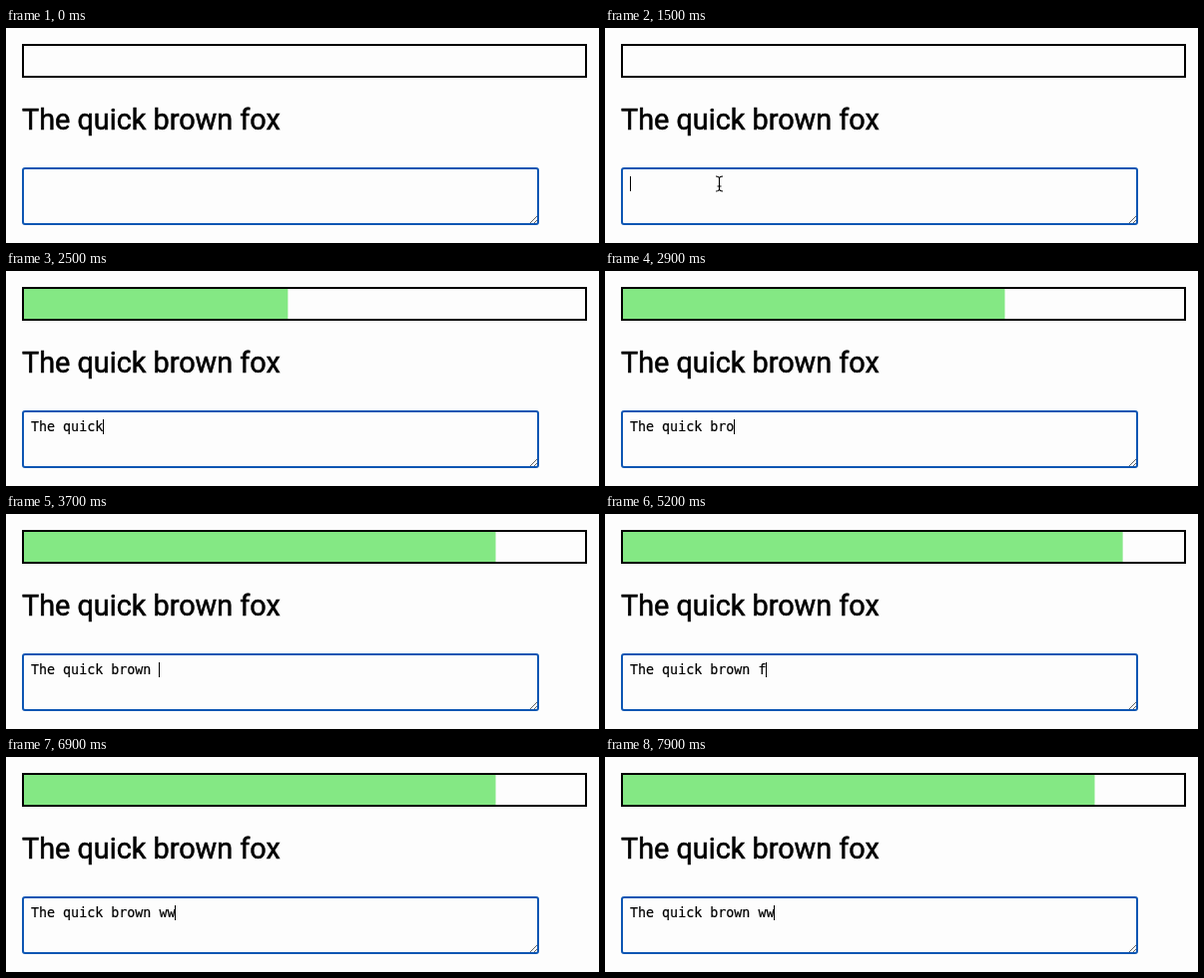
Animation of 594x216 px, one loop 8 s. Source, as an HTML page:

```html
<!DOCTYPE html>
<html lang="en">
<head>
<meta charset="utf-8">
<title>Typing test</title>
<style>
  html, body { margin: 0; width: 100%; height: 100%; overflow: hidden; background: #fdfdfd; }
  svg { display: block; }
  .phrase { font: 400 28.8px Roboto, sans-serif; stroke: #000; stroke-width: .55px; }
  .typed { font: 13.333px "DejaVu Sans Mono", monospace; white-space: pre; stroke: #000; stroke-width: .2px; }
  .line { fill: none; stroke: #000; stroke-width: 2; }
  .grip { stroke: #000; stroke-opacity: .6; }
  .beam { fill: none; stroke: #000; stroke-width: 1.1; }
  .halo { stroke: #fff; stroke-width: 3; }
</style>
</head>
<body>
<svg width="594" height="216" viewBox="0 0 594 216">
  <defs>
    <path id="beam" d="M-3.5 -7.5Q0 -7.5 0 -5Q0 -7.5 3.5 -7.5M0 -5V5M-3.5 7.5Q0 7.5 0 5Q0 7.5 3.5 7.5M-2 2.5H2"/>
  </defs>
  <rect id="bar" x="18" y="18" width="0" height="30" fill="#84e884"/>
  <rect class="line" x="17" y="17" width="564" height="32"/>
  <text class="phrase" x="16" y="101.5">The quick brown fox</text>

  <rect x="17" y="141" width="516" height="56" rx="2" fill="#fdfdfd" stroke="#0d56b3" stroke-width="2"/>
  <path class="grip" d="M525 196l7-7M529 196l3-3"/>
  <text id="typed" class="typed" x="25" y="161"></text>
  <rect id="caret" x="25" y="149" width="1" height="15"/>

  <g id="pointer">
    <use href="#beam" class="beam halo"/>
    <use href="#beam" class="beam"/>
  </g>
</svg>
<script>
  const LOOP = 8000, BLINK = 500, CHAR = 8.027, BAR = 562.5;
  const phrase = 'The quick brown fox';

  // Bursts of keys; '<' is a backspace
  const bursts = [
    { start: 1700, gap: 100, keys: 'The quick bro' },
    { start: 3100, gap: 200, keys: 'wn' },
    { start: 3700, gap: 100, keys: ' fd' },
    { start: 4200, gap: 100, keys: 'd' },
    { start: 4900, gap: 200, keys: '<<<<<' },
    { start: 6400, gap: 200, keys: 'n ' },
    { start: 6800, gap: 100, keys: 'ww' },
    { start: 7300, gap: 120, keys: 'ww' },
    { start: 7700, gap: 200, keys: '<<' }
  ];

  const [bar, typed, caret, pointer] =
    ['bar', 'typed', 'caret', 'pointer'].map(id => document.getElementById(id));

  // Typing restarts the caret's blink, deleting does not
  function stateAt(t) {
    let text = '', blinkStart = -700;
    for (const { start, gap, keys } of bursts) {
      [...keys].forEach((key, i) => {
        const time = start + i * gap;
        if (time > t) return;
        if (key === '<') {
          text = text.slice(0, -1);
        } else {
          text += key;
          blinkStart = time;
        }
      });
    }
    const caretOn = Math.floor((t - blinkStart) / BLINK) % 2 === 0;
    return { text, caretOn };
  }

  function matching(text) {
    let n = 0;
    while (n < text.length && text[n] === phrase[n]) n++;
    return n;
  }

  function movePointer(t) {
    const p = Math.min(1, Math.max(0, (t - 500) / 400));
    const rest = (1 - p) ** 2;
    pointer.setAttribute('transform', `translate(${114.5 + 22 * rest} ${156.5 - 3 * rest})`);
    pointer.style.display = t >= 500 && t < 1700 ? '' : 'none';
  }

  function draw() {
    const t = performance.now() % LOOP;
    const { text, caretOn } = stateAt(t);
    const percent = Math.floor(100 * matching(text) / phrase.length);
    bar.setAttribute('width', BAR * percent / 100);
    if (typed.textContent !== text) typed.textContent = text;
    caret.setAttribute('x', Math.floor(25 + CHAR * text.length));
    caret.style.display = caretOn ? '' : 'none';
    movePointer(t);
    requestAnimationFrame(draw);
  }
  draw();
</script>
</body>
</html>
```
